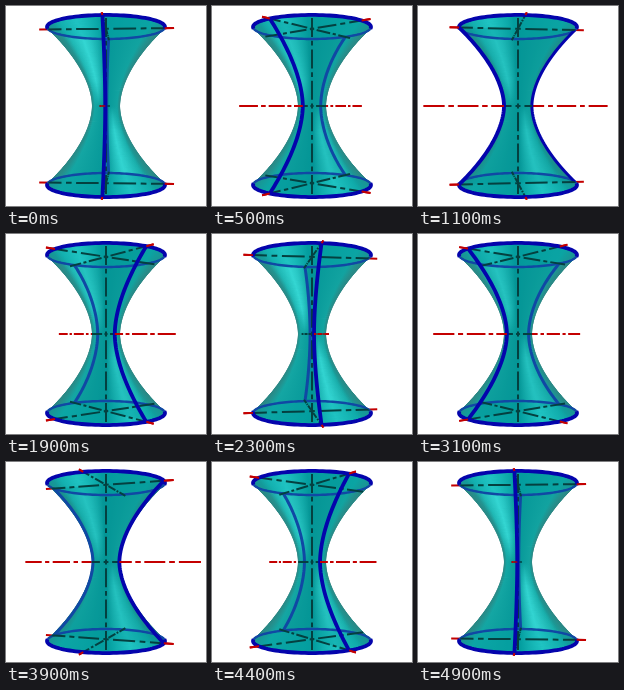
Recreate the animation shown at these times as an HTML page with a canvas. Size 200 by 200 pixels, loop 5000 ms.

```html
<!DOCTYPE html>
<html lang="en">
<head>
<meta charset="utf-8">
<title>Rotating hyperboloid</title>
<style>
html, body { margin: 0; width: 100%; height: 100%; overflow: hidden; background: #fff; }
canvas { display: block; width: 100vw; height: 100vh; }
</style>
</head>
<body>
<canvas id="stage" width="200" height="200"></canvas>
<script>
const ctx = document.getElementById('stage').getContext('2d');
const D = 383, H = 77.2, R = 58.3, WAIST = 14;   // eye distance, half height, radii
const MID = 92.5, RIM = 67.5, POLE = 88;         // half lengths of the axes
const STEP = 2 * Math.PI / 49, START = -87 * Math.PI / 180;
const NEAR = '#0404ac', FAR = '#1048a4', RED = '#c40000', DARK = '#044040';

const radius = z => WAIST + (R - WAIST) * Math.abs(z / H) ** 1.8;

// Perspective view from waist level; sin(a) > 0 faces the viewer.
function project(r, a, z) {
  const k = D / (D - r * Math.sin(a));
  return [100 + r * Math.cos(a) * k, 100 - z * k];
}

function ring(z) {
  const r = radius(z), near = z * D / (D - r), far = z * D / (D + r);
  return [100, 100 - (near + far) / 2, r / Math.sqrt(1 - (r / D) ** 2), Math.abs(near - far) / 2];
}

function stroke(points, color, width) {
  ctx.beginPath();
  points.forEach(p => ctx.lineTo(...p));
  ctx.strokeStyle = color;
  ctx.lineWidth = width;
  ctx.stroke();
}

const span = (n, f) => Array.from({ length: n + 1 }, (_, i) => f(i / n));

// Body, painted from both rims towards the waist so near edges stay visible.
const outline = new Path2D();
const body = document.createElement('canvas');
body.width = body.height = 200;
const paint = body.getContext('2d');
const shade = [[0, '#2b8784'], [.1, '#14a6a3'], [.5, '#059798'], [.9, '#12a3a0'], [1, '#2b8784']];

function fillShade(path, x, rx, stops) {
  const g = paint.createLinearGradient(x - rx, 0, x + rx, 0);
  stops.forEach(s => g.addColorStop(...s));
  paint.fillStyle = g;
  paint.fill(path);
}

for (let z = H; z > 0; z -= .4) {
  for (const side of [1, -1]) {
    const [x, y, rx, ry] = ring(z * side);
    const disc = new Path2D();
    disc.ellipse(x, y, rx, ry, 0, 0, 2 * Math.PI);
    disc.rect(x - rx, y - .5, 2 * rx, 1);
    outline.addPath(disc);
    // glow on the upper left and the lower right
    const glow = a => `rgba(80,255,250,${a * Math.min(1, z / 25)})`;
    const mid = side > 0 ? .24 : .72;
    fillShade(disc, x, rx, shade);
    fillShade(disc, x, rx, [[mid - .2, glow(0)], [mid, glow(.7)], [mid + .22, glow(0)]]);
  }
}
paint.fillStyle = 'rgba(0,165,168,.4)';
for (const z of [H, -H]) {
  paint.beginPath();
  paint.ellipse(...ring(z), 0, 0, 7);
  paint.fill();
}

// Dash-dot line with a dash at both ends; at(s) is the point at position s,
// drawn only between lo and hi.
function dashed(at, half, color, lo = -half, hi = half) {
  const n = Math.round((2 * half - 20) / 33), unit = 2 * half / (33 * n + 20);
  for (let i = 0, s = -half; i <= 2 * n; i++) {
    const len = (i % 2 ? 5 : 20) * unit;
    const a = Math.max(s, lo), b = Math.min(s + len, hi);
    if (a < b) stroke([at(a), at(b)], color, 2);
    s += len + 4 * unit;
  }
}

function axes(turn, color) {
  dashed(s => project(s, turn, 0), MID, color);
  for (const z of [H, -H])
    for (const a of [turn, turn + Math.PI / 2])
      dashed(s => project(s, a, z), RIM, color);
}

function meridian(a) {
  return span(60, u => {
    const z = H * (2 * u - 1);
    return project(radius(z), a, z);
  });
}

function halfRings(from, color, width) {
  for (const z of [H, -H])
    stroke(span(60, u => project(R, from + u * Math.PI, z)), color, width);
}

// The end of an axis that sticks out towards the viewer.
function nearEnd(a, z, half, r) {
  const ahead = Math.sin(a) > 0;
  dashed(s => project(s, a, z), half, RED, ahead ? r : -half, ahead ? half : -r);
}

function draw(n) {
  const turn = START + n * STEP;
  const front = Math.sin(turn) > 0 ? turn : turn + Math.PI;
  const nearSide = meridian(front), farSide = meridian(front + Math.PI);
  ctx.lineJoin = 'round';
  ctx.fillStyle = '#fff';
  ctx.fillRect(0, 0, 200, 200);

  axes(turn, RED);
  ctx.drawImage(body, 0, 0);

  // section plane
  ctx.beginPath();
  [...nearSide, ...farSide.slice().reverse()].forEach(p => ctx.lineTo(...p));
  ctx.fillStyle = 'rgba(0,145,145,.28)';
  ctx.fill();

  halfRings(Math.PI, FAR, 2.4);
  stroke(farSide, Math.sin(front) < .2 ? NEAR : FAR, 3);

  ctx.save();
  ctx.clip(outline);
  axes(turn, DARK);
  dashed(s => [100, 100 + s], POLE, DARK);
  ctx.restore();

  halfRings(0, NEAR, 3.8);
  stroke(nearSide, NEAR, 3.8);

  nearEnd(turn, 0, MID, WAIST);
  for (const z of [H, -H]) {
    nearEnd(turn, z, RIM, R);
    nearEnd(turn + Math.PI / 2, z, RIM, R);
  }
}

let shown = -1;
function tick() {
  const n = Math.floor(performance.now() / 100) % 50;
  if (n !== shown) draw(shown = n);
  requestAnimationFrame(tick);
}
tick();
</script>
</body>
</html>
```
